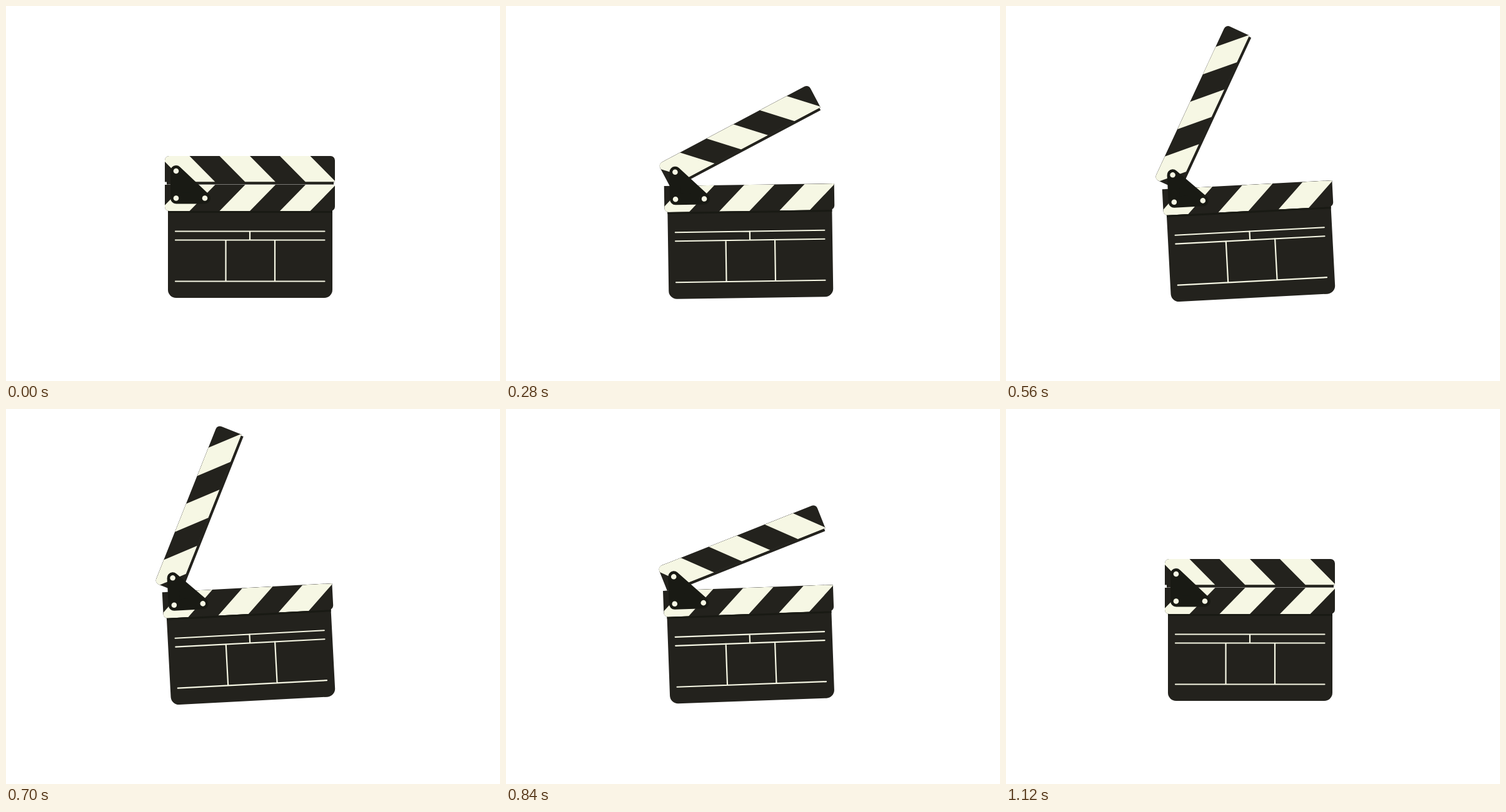
These frames come from a looping animation (790x600 px, 1750 ms). An HTML page:

```html
<!DOCTYPE html>
<html lang="en">
<head>
<meta charset="utf-8">
<title>Clapperboard</title>
<style>
  html, body { margin: 0; height: 100%; overflow: hidden; background: #fff; }
  svg { display: block; }
  .dark { fill: #23221d; }
  .cream { fill: #f6f7e4; }
  .lines { fill: none; stroke: #f6f7e4; stroke-width: 2.2; stroke-linecap: round; }
  .plate { fill: #191a14; stroke: #191a14; stroke-width: 18; stroke-linejoin: round; }
  #rays { stroke: #9fc41c; stroke-linecap: round; }
</style>
</head>
<body>
<svg width="790" height="600" viewBox="0 0 790 600">
  <defs>
    <path id="armShape" d="M254 281.5V247a7 7 0 0 1 7-7H519a7 7 0 0 1 7 7V281.5Z"/>
    <path id="barShape" d="M254 286H526V321a7 7 0 0 1-7 7H261a7 7 0 0 1-7-7Z"/>
    <clipPath id="armClip"><use href="#armShape"/></clipPath>
    <clipPath id="barClip"><use href="#barShape"/></clipPath>
  </defs>
  <g id="board">
    <path class="dark" d="M259 315H522V454a13 13 0 0 1-13 13H272a13 13 0 0 1-13-13Z"/>
    <rect x="259" y="327" width="263" height="4" fill="#191a14"/>
    <use href="#barShape" class="dark"/>
    <path id="barStripes" class="cream" clip-path="url(#barClip)"/>
    <path class="lines" d="M271 360.5H509.5M271 374.5H509.5M271 440.5H509.5M390 360.5v14M351.5 374.5v66M430 374.5v66"/>
    <g id="arm">
      <rect class="dark" x="257" y="281" width="267" height="4.6"/>
      <use href="#armShape" class="dark"/>
      <path id="armStripes" class="cream" clip-path="url(#armClip)"/>
    </g>
    <path class="plate" d="M272 264V307.5H318Z"/>
    <g class="cream">
      <circle cx="272" cy="264" r="4.3"/>
      <circle cx="272" cy="307.5" r="4.3"/>
      <circle cx="318" cy="307.5" r="4.3"/>
    </g>
  </g>
  <g id="rays">
    <path d="M540.5 263.5L579.5 229.5" data-width="2.8"/>
    <path d="M561.5 282H614" data-width="10"/>
    <path d="M544 305L588 332.5" data-width="3.6"/>
  </g>
</svg>
<script>
const LOOP = 1750, STEP = 70;
const BOARD_TILT = 3, ARM_OPEN = 65.5;
const $ = id => document.getElementById(id);
const clamp = x => Math.min(1, Math.max(0, x));

// Three slanted bands; the slant leans right from edge y1 to edge y2.
const stripes = (y1, y2) => [245, 341.5, 438]
  .map(x => `M${x} ${y1}h48.5L${x + 89.5} ${y2}h-48.5Z`).join('');
$('armStripes').setAttribute('d', stripes(240, 281.5));
$('barStripes').setAttribute('d', stripes(328, 286));

// Cubic ease with flat ends and horizontal handles at x1 and x2.
function ease(x, x1 = 1 / 3, x2 = 2 / 3) {
  let lo = 0, hi = 1;
  for (let i = 0; i < 24; i++) {
    const s = (lo + hi) / 2, r = 1 - s;
    if (3 * x1 * s * r * r + 3 * x2 * s * s * r + s ** 3 < x) lo = s;
    else hi = s;
  }
  return lo * lo * (3 - 2 * lo);
}

const ramp = (t, start, end, x1, x2) => ease(clamp((t - start) / (end - start)), x1, x2);

function draw(t) {
  const tilt = BOARD_TILT * (ramp(t, 133, 553) - ramp(t, 762, 972));
  const open = ARM_OPEN * (ramp(t, 62, 692, .28, .44) - ramp(t, 692, 1022, .28, .27));
  $('board').setAttribute('transform', `rotate(${-tilt} 390 371)`);
  $('arm').setAttribute('transform', `rotate(${-open} 272 264)`);

  const rays = $('rays');
  rays.style.display = t >= 980 && t < 1120 ? '' : 'none';
  const thin = clamp((1120 - t) / 140);
  for (const ray of rays.children) ray.setAttribute('stroke-width', ray.dataset.width * thin);
}

const begin = performance.now();
function tick() {
  const t = (performance.now() - begin) % LOOP;
  draw(Math.floor(t / STEP) * STEP);
  requestAnimationFrame(tick);
}
tick();
</script>
</body>
</html>
```
